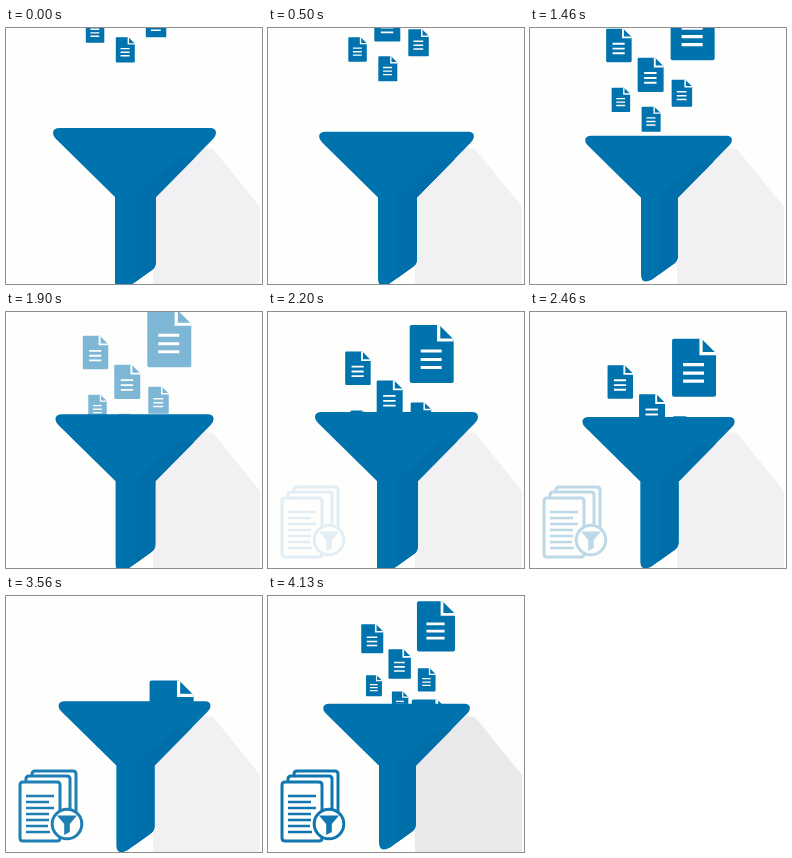
Write an HTML page that moves like this. It is 256 px wide and 256 px high and loops after 5.16 s.

```html
<!DOCTYPE html>
<html lang="en">
<head>
<meta charset="utf-8">
<title>Document funnel</title>
<style>
html, body { margin: 0; width: 100%; height: 100%; overflow: hidden; background: #fefefd; }
svg { display: block; width: 100%; height: 100%; }
</style>
</head>
<body>
<svg viewBox="0 0 256 256">
  <defs>
    <clipPath id="above"><path d="M0 0H256V111H0Z"/></clipPath>
    <g id="doc">
      <path fill="#0073ae" d="M2 0H29.5L44 14.500V56Q44 58 42 58H2Q0 58 0 56V2Q0 0 2 0Z"/>
      <path fill="none" stroke="#fefefd" stroke-width="3.2" d="M29 0V15H44M11 26H32M11 34.500H32M11 42.500H32"/>
    </g>
  </defs>
  <path id="shadow" d="M198 120L207 121L254 179V256H147V168Z"/>
  <g clip-path="url(#above)"><g id="docs"></g></g>
  <g id="funnel">
    <path fill="#0073ae" d="M54 100H204Q210 100 210 105Q210 108 207 111L150 169V234Q150 239 146 242L121 260Q109 266 109 254V169L50 111Q47 108 47 105Q47 100 54 100Z"/>
    <path fill="#006fa9" d="M174 128L129 168V254L146 242Q150 239 150 234V169L190 128.500Z"/>
  </g>
  <g id="report" fill="#fefefd" stroke="#0f76b0" stroke-width="3" stroke-linejoin="round">
    <path d="M26 190V178Q26 175 29 175H67Q70 175 70 178V222H60"/>
    <path d="M20 195V183Q20 180 23 180H61Q64 180 64 183V225H54"/>
    <path d="M17 186H51Q54 186 54 189V242Q54 245 51 245H17Q14 245 14 242V189Q14 186 17 186Z"/>
    <path fill="none" stroke-width="2.6" d="M20 200H48M20 206H43M20 212H48M20 218H43M20 224H43M20 230H42M20 236H44"/>
    <circle cx="61" cy="228" r="14.800"/>
    <path fill="#0f76b0" stroke="none" d="M51 219.500H71L63.800 228V236L58.200 239V228Z"/>
  </g>
</svg>
<script>
const LOOP = 5160, LAST = 4130, BEAT = 540, BLINK = 1080;
const $ = id => document.getElementById(id);

// x, y and width of each sheet at one second
const sheets = [
  [81, 35.5, 18.5], [111, 54.5, 19], [141, 27.5, 20.5],
  [107, 5.5, 26], [75.5, -23.5, 25.5], [140, -50, 44], [134, 63.6, 44]
].map(([x, y, w]) => {
  const el = document.createElementNS("http://www.w3.org/2000/svg", "use");
  el.setAttribute("href", "#doc");
  $("docs").append(el);
  return { el, x, y, k: w / 44 };
});
const extra = sheets[sheets.length - 1].el;

const beat = [[0, 1], [255, 1], [280, .97], [300, .934], [320, .932], [330, .9], [460, .9], [540, 1]];
const clamp = v => Math.max(0, Math.min(1, v));

function track(keys, t) {
  const i = keys.findIndex(k => k[0] > t);
  const [t0, a] = keys[i - 1], [t1, b] = keys[i];
  return a + (b - a) * (t - t0) / (t1 - t0);
}

function sheetAlpha(t) {
  const d = Math.abs(t % BLINK - 835) / 145;
  return d < 1 ? 1 - .255 * (1 + Math.cos(Math.PI * d)) : 1;
}

function draw(now) {
  const t = Math.min(now % LOOP, LAST), end = t === LAST;
  const dt = end ? 0 : Math.max(t, 140) - 1000;
  for (const { el, x, y, k } of sheets)
    el.setAttribute("transform", `translate(${x + dt * .0014} ${y + dt * .0525}) scale(${k})`);
  extra.setAttribute("visibility", end ? "visible" : "hidden");
  $("docs").setAttribute("transform", end ? "translate(28 48.500) scale(.864)" : "");
  $("docs").setAttribute("opacity", end ? 1 : sheetAlpha(t));
  $("shadow").setAttribute("fill", end ? "#e9e9ec" : "#f1f1f4");
  $("funnel").setAttribute("transform", `translate(129 177) scale(${track(beat, t % BEAT)}) translate(-129 -177)`);
  $("report").setAttribute("opacity", clamp((t - 2020) / 1650));
}

let start;
function tick(now) {
  start ??= now;
  draw(now - start);
  requestAnimationFrame(tick);
}
draw(0);
requestAnimationFrame(tick);
</script>
</body>
</html>
```
